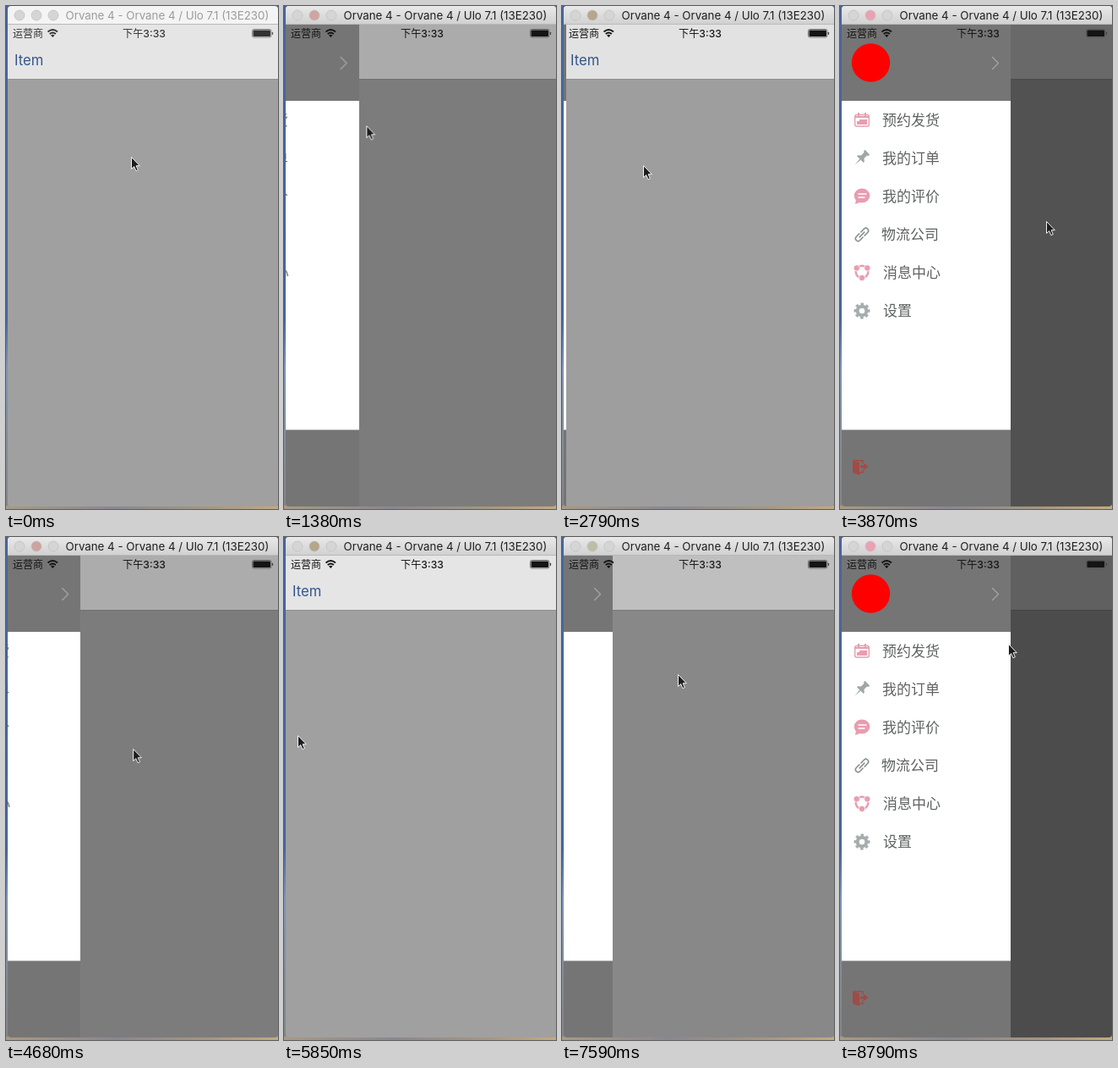
Recreate the animation shown at these times as an HTML page. Size 322 by 594 pixels, loop 9.15 s.

```html
<!DOCTYPE html>
<html lang="zh">
<head>
<meta charset="utf-8">
<title>Side drawer</title>
<style>
html, body { margin: 0; width: 100%; height: 100%; overflow: hidden; background: #5a6f92; }
svg { display: block; width: 100vw; height: 100vh; }
text { font-family: Inter, "Noto Sans CJK SC", "Noto Sans CJK", sans-serif; }
.anim { animation: 9150ms linear infinite; }
.drawer { animation-name: drawer; }
.shade { animation-name: shade; }
.cursor { animation-name: cursor; }
.bar { animation-name: bar; }
.title { animation-name: title; }
.status { animation-name: status; }
.light { animation-name: light; }
.menu text { font-size: 17px; fill: #5f6262; }
.pink { fill: #e89db0; }
.gray { fill: #a0a7a7; }
.line { fill: none; stroke-linecap: round; stroke-linejoin: round; }

@keyframes drawer {
  0%, 11.8% { transform: translateX(-200px); }
  18.03% { transform: translateX(-36px); }
  20%, 27.87% { transform: translateX(0); }
  30.49%, 30.82% { transform: translateX(-197px); }
  31.48%, 38.03% { transform: translateX(-200px); }
  41%, 46.56% { transform: translateX(0); }
  54.64%, 64.92% { transform: translateX(-200px); }
  71.04%, 78.69% { transform: translateX(0); }
  82.95%, 83.28% { transform: translateX(-142px); }
  85.25%, 93.11% { transform: translateX(-200px); }
  96.07%, 100% { transform: translateX(0); }
}
@keyframes shade {
  0%, 11.8% { opacity: 0; }
  18.03% { opacity: .82; }
  20%, 27.87% { opacity: 1; }
  30.49%, 30.82% { opacity: .02; }
  31.48%, 38.03% { opacity: 0; }
  41% { opacity: .9; }
  42.3%, 42.62% { opacity: .94; }
  43.61%, 46.56% { opacity: 1; }
  54.64%, 64.92% { opacity: 0; }
  71.04%, 78.69% { opacity: 1; }
  82.95%, 83.28% { opacity: .29; }
  85.25%, 93.11% { opacity: 0; }
  96.07%, 100% { opacity: 1; }
}
@keyframes cursor {
  0%, 3.93% { transform: translate(148px, 178px); }
  9.51%, 11.48% { transform: translate(8px, 150px); }
  18.03% { transform: translate(170px, 134px); }
  20.33%, 20.66% { transform: translate(186px, 131px); }
  23.93%, 27.87% { transform: translate(291px, 182px); }
  30.49%, 30.82% { transform: translate(96px, 188px); }
  34.43%, 38.03% { transform: translate(14px, 240px); }
  42.3%, 42.62% { transform: translate(244px, 254px); }
  43.61%, 46.56% { transform: translate(264px, 255px); }
  54.64% { transform: translate(64px, 246px); }
  60.98%, 62.62% { transform: translate(24px, 236px); }
  63.93%, 64.92% { transform: translate(16px, 234px); }
  71.04% { transform: translate(215px, 196px); }
  76.5%, 78.69% { transform: translate(280px, 168px); }
  82.95%, 83.28% { transform: translate(137px, 162px); }
  85.25% { transform: translate(80px, 160px); }
  92.79%, 93.11% { transform: translate(4px, 130px); }
  96.07%, 100% { transform: translate(199px, 126px); }
}
@keyframes bar {
  0%, 7.87% { opacity: 0; }
  7.88%, 100% { opacity: 1; }
}
@keyframes title {
  0%, 7.87% { fill: #9b9b9b; }
  7.88%, 100% { fill: #1e1e1e; }
}
@keyframes status {
  0%, 7.87% { opacity: .85; }
  7.88%, 100% { opacity: 1; }
}
@keyframes light {
  0%, 7.87% { fill: #d5d5d5; }
  7.88%, 11.8% { fill: #b5a68c; }
  18.03%, 27.87% { fill: #eaa2b3; }
  30.49%, 38.03% { fill: #b5a68c; }
  41%, 46.56% { fill: #eaa2b3; }
  54.64%, 64.92% { fill: #b5a68c; }
  71.04%, 78.69% { fill: #eaa2b3; }
  82.95%, 83.28% { fill: #bebea8; }
  85.25%, 93.11% { fill: #b5a68c; }
  96.07%, 100% { fill: #eaa2b3; }
}
</style>
</head>
<body>
<svg viewBox="0 0 322 594" preserveAspectRatio="none">
  <defs>
    <linearGradient id="desk" x2="0" y2="1">
      <stop offset="0" stop-color="#46659b"/>
      <stop offset=".62" stop-color="#46659b"/>
      <stop offset=".72" stop-color="#7d95b4"/>
      <stop offset="1" stop-color="#858585"/>
    </linearGradient>
    <linearGradient id="floor">
      <stop offset="0" stop-color="#a89a85"/>
      <stop offset=".4" stop-color="#8b8791"/>
      <stop offset=".75" stop-color="#a59783"/>
      <stop offset="1" stop-color="#c0aa80"/>
    </linearGradient>
    <linearGradient id="chrome" x2="0" y2="1">
      <stop offset="0" stop-color="#e9e9e9"/>
      <stop offset="1" stop-color="#d0d0d0"/>
    </linearGradient>
    <clipPath id="win"><path d="M2 22H322V587Q322 591 318 591H6Q2 591 2 587Z"/></clipPath>
  </defs>

  <rect width="322" height="594" fill="url(#desk)"/>
  <rect y="590" width="322" height="4" fill="url(#floor)"/>

  <path d="M2 22V4Q2 0 6 0H318Q322 0 322 4V22Z" fill="#f4f4f4"/>
  <path class="anim bar" d="M2 22V4Q2 0 6 0H318Q322 0 322 4V22Z" fill="url(#chrome)"/>
  <rect x="2" y="21" width="320" height="1" fill="#b9b9b9"/>
  <g fill="#d5d5d5" stroke="#bdbdbd" stroke-width=".7">
    <circle cx="16" cy="11" r="6"/>
    <circle class="anim light" cx="36" cy="11" r="6"/>
    <circle cx="56" cy="11" r="6"/>
  </g>
  <text class="anim title" x="70.500" y="16" font-size="13.300">Orvane 4 - Orvane 4 / Ulo 7.1 (13E230)</text>

  <g clip-path="url(#win)">
    <rect x="2" y="22" width="320" height="569" fill="#a0a0a0"/>
    <rect x="2" y="22" width="320" height="64" fill="#e5e5e5"/>
    <rect x="2" y="86" width="320" height=".7" fill="#8c8c8c"/>
    <text x="10" y="70" font-size="16.700" fill="#34568c">Item</text>
    <g class="anim shade">
      <rect x="2" y="22" width="320" height="64" fill-opacity=".58"/>
      <rect x="2" y="86" width="320" height="505" fill-opacity=".52"/>
    </g>

    <g class="anim drawer">
      <rect x="2" y="22" width="200" height="569" fill="#757575"/>
      <rect x="2" y="112" width="200" height="388.500" fill="#fff"/>
      <circle cx="36.500" cy="67" r="22.700" fill="red"/>
      <path class="line" d="M180.500 60.500L187.500 67.500L180.500 74.500" stroke="#a6a6a6" stroke-width="1.200"/>

      <g class="menu">
        <text x="50" y="141">预约发货</text>
        <text x="50" y="186">我的订单</text>
        <text x="50" y="231">我的评价</text>
        <text x="49" y="276">物流公司</text>
        <text x="51" y="321">消息中心</text>
        <text x="51" y="366">设置</text>
      </g>

      <!-- calendar -->
      <g transform="translate(26 135)">
        <rect class="line" x="-8.300" y="-6.500" width="16.600" height="13.500" rx="2" stroke="#e89db0" stroke-width="1.400"/>
        <path class="pink" d="M-5-9H-3V-5H-5ZM3-9H5V-5H3ZM-8-5H8V-3H-8ZM-6 1H-3V-1H6V5H-6Z"/>
      </g>
      <!-- pin -->
      <g class="gray" transform="translate(26 179) rotate(45)">
        <path d="M-4-9H4V-7L2.500-6V-1L5.500 1.500V3H-5.500V1.500L-2.500-1V-6L-4-7Z"/>
        <path d="M-.9 3H.9L0 12Z"/>
      </g>
      <!-- bubble -->
      <g transform="translate(26 224)">
        <ellipse class="pink" rx="9.300" ry="8.400"/>
        <path class="pink" d="M-7 4L-8 10L0 7Z"/>
        <path class="line" d="M-4-2H5M-4 2H3" stroke="#fff" stroke-width="1.300"/>
      </g>
      <!-- link -->
      <g class="line" transform="translate(26 270) rotate(-45)" stroke="#8b9191" stroke-width="1.600">
        <path d="M-1.500-3H-6.500A3 3 0 0 0-6.500 3H-1.500M1.500-3H6.500A3 3 0 0 1 6.500 3H1.500M-4 0H4"/>
      </g>
      <!-- ring of three -->
      <g transform="translate(26 314)">
        <circle class="line" r="7.300" stroke="#e89db0" stroke-width="2.500"/>
        <g class="pink" stroke="#fff" stroke-width=".8">
          <circle cx="-6.300" cy="-4.600" r="3.700"/>
          <circle cx="6.300" cy="-4.600" r="3.700"/>
          <circle cy="7" r="3.700"/>
        </g>
      </g>
      <!-- gear -->
      <g transform="translate(26 360)" fill="none" stroke="#a5adad">
        <circle r="5.300" stroke-width="4"/>
        <circle r="8" stroke-width="3" stroke-dasharray="3.400 2.883" transform="rotate(-12)"/>
      </g>
      <!-- exit -->
      <g transform="translate(15 536)" fill="#a14b46">
        <path d="M0 1L8 3V18L0 15Z"/>
        <path class="line" d="M1 .8H12V4M12 12V15H8" stroke="#a14b46" stroke-width="1.400"/>
        <path d="M9 6.500H13V3.800L18.500 8L13 12V9.500H9Z"/>
      </g>
    </g>

    <g class="anim status" fill="#141414">
      <text x="8" y="36.700" font-size="12">运营商</text>
      <path d="M49.500 30.500Q55.300 25.500 61 30.500M51.700 33Q55.300 30 58.900 33" fill="none" stroke="#141414" stroke-width="1.700"/>
      <path d="M53 34.600Q55.300 33 57.500 34.600L55.300 37Z"/>
      <text x="163.500" y="36.700" font-size="12.200" font-weight="500" text-anchor="middle">下午3:33</text>
      <rect x="291.500" y="27.500" width="22.500" height="9.500" rx="2" fill="none" stroke="#555" stroke-width=".8"/>
      <rect x="292.500" y="28.500" width="20.500" height="7.500" rx="1"/>
      <rect x="314.800" y="30.700" width="1.300" height="3.200" rx=".6" fill="#444"/>
    </g>
  </g>

  <g class="anim cursor">
    <path d="M.5 .5V14.500L3.700 11.600L5.900 16.700L8.300 15.700L6.100 10.700H10.300Z" fill="#1c1c20" stroke="#f2f2f2" stroke-width="1"/>
  </g>
</svg>
</body>
</html>
```
